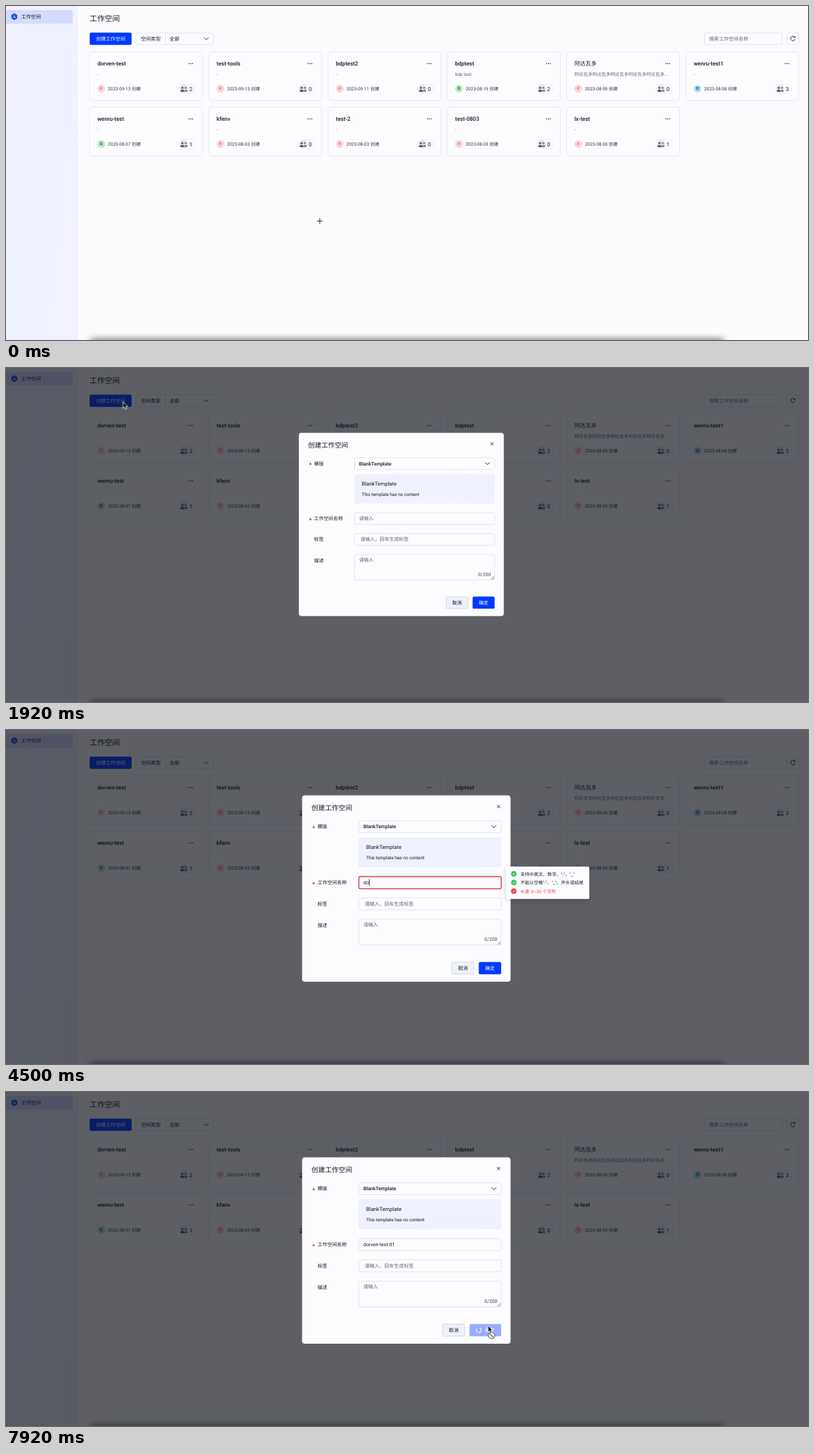
An HTML page that plays this animation: 1158 px wide and 483 px high, repeating every 8000 ms.

```html
<!DOCTYPE html>
<html lang="zh-CN">
<head>
<meta charset="utf-8">
<style>
html, body { margin: 0; width: 100%; height: 100%; overflow: hidden; background: #fcfcfe; }
svg { display: block; width: 1158px; height: 483px; }
text { font-family: Roboto, "Noto Sans CJK SC", "Noto Sans CJK", sans-serif; text-rendering: geometricPrecision; white-space: pre; }
</style>
</head>
<body>
<svg id="stage" viewBox="0 0 1158 483"></svg>
<script>
const BLUE = '#003aff', INK = '#15171d', HINT = '#60636d', LINE = '#dddfea';

// Text is placed by its left edge and the vertical centre of its line.
const text = (x, y, s, size = 7.07, fill = INK, weight = 400, more = '') =>
  `<text x="${x}" y="${(y + size * .36).toFixed(2)}" font-size="${size}" fill="${fill}" font-weight="${weight}" ${more}>${s}</text>`;
const box = (x, y, w, h, fill = '#fdfdff', stroke = LINE, r = 2, more = '') =>
  `<rect x="${x}" y="${y}" width="${w}" height="${h}" rx="${r}" fill="${fill}" stroke="${stroke}" stroke-width=".8" ${more}/>`;
const line = (d, stroke = INK, w = .9, more = '') =>
  `<path d="${d}" fill="none" stroke="${stroke}" stroke-width="${w}" ${more}/>`;
const dot = (x, y, r, fill, more = '') => `<circle cx="${x}" cy="${y}" r="${r}" fill="${fill}" ${more}/>`;
const chevron = (x, y) => line(`M${x - 3.3} ${y - 1.6}l3.3 3.3 3.3-3.3`);
const centred = 'text-anchor="middle"';

const AVATARS = { F: ['#ffd3d5', '#c93a42'], 车: ['#b9ecc6', '#19703a'], 蓝: ['#b5e2fb', '#1767a5'] };
const CARDS = [
  ['dorven-test', '-', 'F', '2023-09-13', 2],
  ['test-tools', '-', 'F', '2023-09-13', 0],
  ['bdptest2', '-', 'F', '2023-09-11', 0],
  ['bdptest', 'bdp test', '车', '2023-08-19', 2],
  ['阿达瓦多', '阿达瓦多'.repeat(5) + '...', 'F', '2023-08-09', 0],
  ['wenru-test1', '-', '蓝', '2023-08-08', 3],
  ['wenru-test', '-', '车', '2023-08-07', 1],
  ['kfenv', '-', 'F', '2023-08-03', 0],
  ['test-2', '-', 'F', '2023-08-03', 0],
  ['test-0803', '-', 'F', '2023-08-03', 0],
  ['lx-test', '-', 'F', '2023-08-03', 1],
];

function card([title, note, avatar, date, members], i) {
  const x = 120.7 + i % 6 * 172.2, y = i < 6 ? 66.4 : 146.4;
  const [back, ink] = AVATARS[avatar];
  return `<g transform="translate(${x} ${y})">` +
    box(0, 0, 163, 70.4, '#fdfdff', '#e4e5f2', 4) +
    text(11.2, 16.8, title, 8.05, INK, 500) +
    [143.4, 146, 148.6].map(cx => dot(cx, 16.8, .75, INK)).join('') +
    text(11.2, 32.6, note, 6.5, HINT) +
    dot(16.8, 53.2, 5.6, back) + text(16.8, 53.2, avatar, 5, ink, 700, centred) +
    text(26.4, 53.2, date + ' 创建', 6.5, '#33353d') +
    box(129.6, 46.8, 23, 13, '#fdfdff', '#e7e7f0', 6.5) +
    dot(136.2, 53.3, 6, '#e5e5ee') +
    dot(134, 51.8, 1.5, '#55565f') + dot(138.6, 51.8, 1.5, '#85868f') +
    '<path d="M131.3 57.5v-1.6q2.7-3 5.4 0v1.6z" fill="#55565f"/>' +
    '<path d="M137 57.5v-1.6q2-3 4.3 0v1.6z" fill="#85868f"/>' +
    text(144, 53.4, members, 8.05) + '</g>';
}

const page =
  '<rect width="1158" height="483" fill="#fcfcfe"/>' +
  '<rect width="104" height="483" fill="url(#side)"/>' +
  box(-3, 6, 99.5, 19.5, '#d5dbfc', 'none', 3) +
  '<path d="M12 10.6l4.2 2.4v5l-4.2 2.4-4.2-2.4v-5z" fill="#1648f0"/>' +
  line('M12 13.4v2.2m-2.2 1.6l2.2-1.6 2.2 1.6', '#fff', .9) +
  text(22, 15.5, '工作空间') +
  text(120.8, 18, '工作空间', 10.9, INK, 500) +
  box(120.8, 38.6, 60.6, 17.6, BLUE, 'none', 2, 'id="create"') +
  text(151.1, 47.3, '创建工作空间', 7.07, '#fff', 400, centred) +
  box(187.6, 38.9, 111.8, 16.8) + line('M230.3 39v16.6', LINE, .8) +
  text(195, 47.3, '空间类型') + text(236.3, 47.3, '全部', 7.07, INK, 500) + chevron(289.3, 47.2) +
  box(1008.6, 38.9, 112, 16.8) + text(1015.3, 47.3, '搜索工作空间名称', 7.07, HINT) +
  box(1127.7, 38.9, 17, 17) +
  line('M1138.9 45.4a3.2 3.2 0 1 0 .3 2.6M1139.3 43.6v2.2h-2.2') +
  CARDS.map(card).join('') +
  '<rect x="121" y="481" width="916" height="20" rx="5" fill="#000" opacity=".5" filter="url(#soft)"/>';

const label = (y, s, required) => text(449.8, y, s) + (required ? text(442.3, y + 1.8, '*', 9, '#d9263a', 700) : '');
const dialog =
  '<rect x="427.5" y="94.4" width="301" height="269.6" rx="4" fill="#fdfdff"/>' +
  text(441, 112.5, '创建工作空间', 9.82, INK, 500) +
  line('M709 108.4l4.4 4.4m0-4.4l-4.4 4.4') +
  label(139.6, '模版', true) + label(220.5, '工作空间名称', true) + label(251.3, '标签') + label(282, '描述') +
  box(509.5, 131.2, 205.6, 17.2) + text(516, 139.7, 'BlankTemplate', 7.07, INK, 500) + chevron(704.5, 139.6) +
  box(509.2, 155.2, 206.2, 43.4, 'url(#panel)', 'none') +
  text(520, 169.4, 'BlankTemplate', 7.7) + text(520, 185, 'This template has no content', 6.5) +
  box(509.5, 212, 205.6, 17.4, '#fdfdff', LINE, 2, 'id="field"') +
  text(516, 220.6, '', 7.07, INK, 400, 'id="typed"') +
  '<rect id="caret" y="215.8" width=".8" height="9.4" fill="#111"/>' +
  box(509.5, 242.7, 205.6, 17.2) + text(518, 251.3, '请输入，回车生成标签', 7.07, HINT) +
  box(509.5, 273.6, 205.6, 37.2) + text(516, 281.6, '请输入', 7.07, HINT) +
  text(709.6, 302.7, '0/200', 7.07, '#44464e', 400, 'text-anchor="end"') +
  line('M709.6 310.2l4.6-4.6m-2 4.6l2-2', '#555', .7) +
  '<g id="cancel">' + box(643.7, 335.7, 32.2, 17.2, '#eef1fb', '#ccd2e4') +
  text(659.8, 344.3, '取消', 7.07, INK, 500, centred) + '</g>' +
  box(682.6, 335.4, 32.4, 17.8, BLUE, 'none', 2, 'id="confirm"') +
  text(698.8, 344.3, '确定', 7.07, '#fff', 500, centred + ' id="confirmText"') +
  line('M686.2 344.3a3.5 3.5 0 1 1-3.5-3.5', '#fff', 1, 'id="spinner"');

const RULES = ['支持中英文、数字、"-"、"_"', '不能以空格"-"、"_"、开头或结尾', '长度 3~30 个字符'];
const tooltip =
  '<path d="M722.5 217.6l-3 3.2 3 3.2z" fill="#fdfdff"/>' +
  '<rect x="722" y="197.5" width="120.2" height="46.8" rx="1.5" fill="#fdfdff" filter="url(#lift)"/>' +
  RULES.map((rule, i) => {
    const y = 208 + i * 12.5;
    return dot(733.2, y, 3.9, '', 'class="mark"') + line(`M731.4 ${y}l1.4 1.4 2.4-2.6`, '#fff', .9) +
      text(742.8, y + .2, rule, 6.5, INK, 400, 'class="rule"');
  }).join('');

const cursors =
  `<g id="cross">${line('M-4.2 0h8.4M0-4.2v8.4')}</g>` +
  '<path id="arrow" d="M0 0v9.3l2.1-1.9 1.5 3.4 1.7-.8-1.5-3.2h2.9z" fill="#000" stroke="#fff" stroke-width=".8"/>' +
  `<g id="beam">${line('M-2.4-4.6q2.4 0 2.4 1.4v6.4q0 1.4-2.4 1.4m4.8-9.2q-2.4 0-2.4 1.4m0 6.4q0 1.4 2.4 1.4', '#111', 1)}</g>` +
  `<g id="blocked">${dot(5, 14, 4.7, '#eef0f6', 'stroke="#777" stroke-width="1.3"') + line('M1.8 10.8l6.4 6.4', '#777', 1.3)}</g>`;

const stage = document.getElementById('stage');
stage.innerHTML = `<defs>
<linearGradient id="side" x2="1" y2=".5"><stop stop-color="#f1f0fe"/><stop offset=".6" stop-color="#eef3ff"/><stop offset="1" stop-color="#f1f2fe"/></linearGradient>
<linearGradient id="panel"><stop stop-color="#eef0fd"/><stop offset=".6" stop-color="#f1f2ff"/><stop offset="1" stop-color="#eff1fe"/></linearGradient>
<filter id="soft" x="-5%" y="-100%" width="110%" height="300%"><feGaussianBlur stdDeviation="5"/></filter>
<filter id="lift" x="-10%" y="-20%" width="120%" height="150%"><feDropShadow dx="0" dy="2" stdDeviation="3" flood-opacity=".2"/></filter>
</defs>${page}
<rect id="mask" width="1158" height="483" fill="#0c0e16" fill-opacity=".66"/>
<g id="dialog">${dialog}</g><g id="tooltip">${tooltip}</g><g id="cursor">${cursors}</g>`;

const $ = Object.fromEntries([...stage.querySelectorAll('[id]')].map(el => [el.id, el]));
const marks = stage.querySelectorAll('.mark'), rules = stage.querySelectorAll('.rule');
const show = (el, on) => el.style.display = on ? '' : 'none';
const set = (el, attrs) => { for (const key in attrs) el.setAttribute(key, attrs[key]); };
const clamp = v => Math.max(0, Math.min(1, v));
const inside = (v, a, b) => v >= a && v < b;

// cubic-bezier(.3, 1.3, .3, 1): a zoom with a slight overshoot
function overshoot(u) {
  const curve = (s, a, b) => 3 * (1 - s) ** 2 * s * a + 3 * (1 - s) * s * s * b + s ** 3;
  let lo = 0, hi = 1;
  for (let i = 0; i < 20; i++) {
    const mid = (lo + hi) / 2;
    if (curve(mid, .3, .3) < u) lo = mid; else hi = mid;
  }
  return curve(hi, 1.3, 1);
}

// time, x, y
const PATH = [[0, 453, 311], [420, 453, 311], [670, 425, 284], [830, 425, 284], [1580, 169, 49], [2330, 169, 49],
  [2750, 545, 151], [3080, 541, 190], [3500, 537, 220], [6750, 537, 220], [7500, 696, 338], [8000, 696, 338]];
function pointer(t) {
  const i = PATH.findIndex(p => p[0] > t), [t0, x0, y0] = PATH[i - 1], [t1, x1, y1] = PATH[i];
  const u = (t - t0) / (t1 - t0), e = u * u * (3 - 2 * u);
  return [x0 + (x1 - x0) * e, y0 + (y1 - y0) * e];
}

const NAME = 'dorven-test-01';
const KEYS = [4160, 4490, 4660, 4830, 4910, 5080, 5330, 5490, 5580, 5660, 5830, 5990, 6160, 6410];

function draw(now) {
  const t = Math.floor((now % 8000 + 4) * .012) / .012; // 12 pictures a second
  const open = t >= 1910, focused = inside(t, 3570, 7570), loading = t >= 7660;
  const [x, y] = pointer(Math.min(t, 7999));

  set($.create, { fill: !open && x < 181 && y < 56 ? '#0d33bd' : BLUE });
  show($.mask, open);
  show($.dialog, open);
  const scale = .5 + .5 * overshoot(clamp((t - 1787) / 400));
  set($.dialog, { transform: `translate(150 50) scale(${scale}) translate(-150 -50)` });

  const count = KEYS.filter(k => k <= t).length;
  const tooShort = inside(t, 4400, 4660);
  $.typed.textContent = count ? NAME.slice(0, count) : '请输入';
  set($.typed, { fill: count ? INK : HINT });
  set($.caret, { x: 516.2 + (count ? $.typed.getComputedTextLength() : 0) });
  show($.caret, focused);
  set($.field, {
    stroke: tooShort ? '#e5404b' : focused ? '#2a5cf0' : LINE,
    'stroke-width': focused ? 1.5 : .8,
  });

  const zoom = clamp((t - 3663) / 200) * clamp((7600 - t) / 150);
  show($.tooltip, zoom > 0);
  set($.tooltip, { opacity: zoom, transform: `translate(722 221) scale(${.5 + .5 * zoom}) translate(-722 -221)` });
  marks.forEach((mark, i) => {
    const bad = tooShort && i === 2;
    set(mark, { fill: bad ? '#e5404b' : t < 4400 ? '#a9acb8' : '#3fbf62' });
    set(rules[i], { fill: bad ? '#e5404b' : INK });
  });

  set($.cancel, { transform: `translate(${loading ? -13.4 : 0})` });
  set($.confirm, loading ? { x: 669.2, width: 45.8, fill: '#98adff' } : { x: 682.6, width: 32.4, fill: BLUE });
  set($.confirmText, { x: loading ? 698.6 : 698.8 });
  show($.spinner, loading);
  set($.spinner, { transform: `rotate(${(t - 7920) * .36 - 60} 682.7 344.3)` });

  const overField = open && x > 509 && (inside(y, 212, 230) || inside(y, 242, 260) || inside(y, 273, 311));
  const visible = !inside(t, 1660, 1910) && !inside(t, 4160, 6820);
  set($.cursor, { transform: `translate(${x} ${y})` });
  show($.cursor, visible);
  show($.cross, t < 410);
  show($.beam, overField);
  show($.arrow, t >= 410 && !overField);
  show($.blocked, loading);
}

const start = performance.now();
(function tick() {
  draw(performance.now() - start);
  requestAnimationFrame(tick);
})();
</script>
</body>
</html>
```
